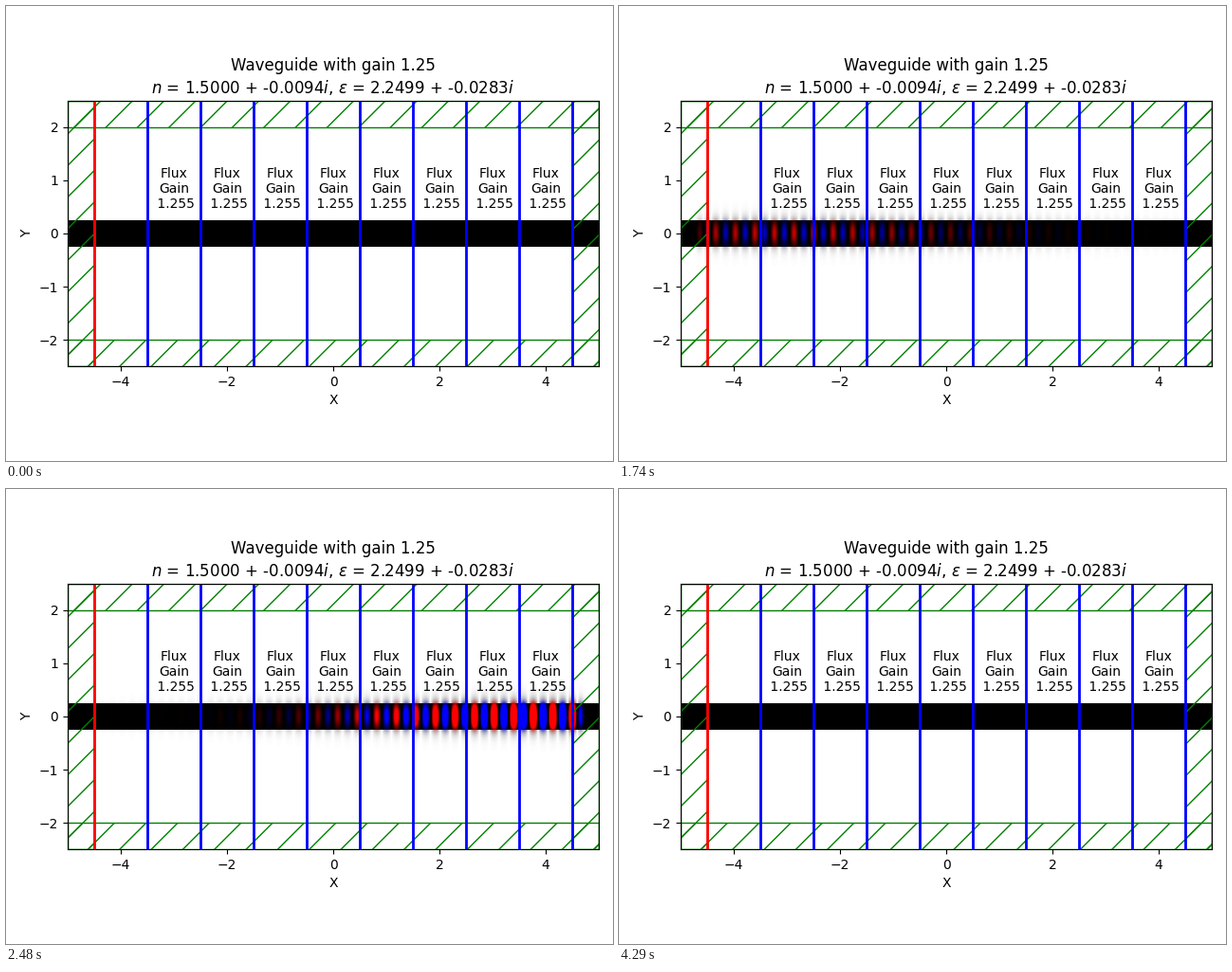
Recreate the animation shown at these times as a matplotlib script. Size 640 px wide and 480 px high, loop 4360 ms.

```python
import numpy as np
import matplotlib.pyplot as plt
from matplotlib.animation import FuncAnimation
from matplotlib.colors import LinearSegmentedColormap
from matplotlib.patches import Rectangle

FRAMES, LOOP_MS = 65, 4360
W, H, DPI = 640, 480, 100

# Guided mode of the slab
WAVELENGTH, CORE_N, HALF_WIDTH = 0.532, 1.5, 0.25
K0 = 2 * np.pi / WAVELENGTH
KAPPA = 4.795
BETA = np.sqrt((CORE_N * K0) ** 2 - KAPPA ** 2)
GAMMA = np.sqrt(BETA ** 2 - K0 ** 2)

# Pulse; times are counted in frames
SOURCE_X, PML = -4.5, 0.5
SPEED = 0.694
PEAK, SIGMA = 24.5, 4.7
AMPLITUDE, GAIN = 0.8, np.log(1.255) / 2
PHASE = 2 * np.pi * 0.44

plt.rcParams["font.family"] = "DejaVu Sans"
fig = plt.figure(figsize=(W / DPI, H / DPI), dpi=DPI)
ax = fig.add_axes([65 / W, 100 / H, 560 / W, 280 / H])


def centers(low, high, count):
    step = (high - low) / count
    return low + step * (np.arange(count) + 0.5)


x = centers(-5, 5, 560)
y = np.abs(centers(-0.75, 0.75, 84))
dist = np.abs(x - SOURCE_X)

# Cosine in the core, exponential tail outside
profile = np.where(
    y <= HALF_WIDTH,
    np.cos(KAPPA * y),
    np.cos(KAPPA * HALF_WIDTH) * np.exp(-GAMMA * (y - HALF_WIDTH)),
)
depth = np.clip((np.abs(x) - (5 - PML)) / PML, 0, 1)
absorb = np.exp(-17.3 * depth ** 3)
carrier = AMPLITUDE * absorb * np.exp(GAIN * dist) * np.cos(BETA * dist - PHASE)


def field(frame):
    lag = frame - PEAK - dist / SPEED
    return np.outer(profile, carrier * np.exp(-lag ** 2 / (2 * SIGMA ** 2)))


cmap = LinearSegmentedColormap.from_list(
    "field", [(0, 0, 1, 1), (0, 0, 0, 0), (1, 0, 0, 1)], N=255
)
ax.add_patch(Rectangle((-5, -HALF_WIDTH), 10, 2 * HALF_WIDTH, color="k", lw=0, zorder=-1))
image = ax.imshow(
    field(0), cmap=cmap, vmin=-1, vmax=1, origin="lower",
    extent=(-5, 5, -0.75, 0.75), interpolation="nearest", aspect="auto",
)

# Absorbing layers
for x0, y0, w, h in [(-5, -2.5, PML, 5), (4.5, -2.5, PML, 5),
                     (-5, 2, 10, PML), (-5, -2.5, 10, PML)]:
    ax.add_patch(Rectangle((x0, y0), w, h, fc="none", ec="g", hatch="/", lw=1))

# Source and flux monitors
ax.plot([SOURCE_X] * 2, [-2.5, 2.5], "r", lw=2)
for pos in np.arange(-3.5, 5):
    ax.plot([pos] * 2, [-2.5, 2.5], "b", lw=2)
for pos in np.arange(-3, 5):
    ax.text(pos, 0.48, "Flux\nGain\n 1.255", ha="center")

ax.set_xlim(-5, 5)
ax.set_ylim(-2.5, 2.5)
ax.set_xticks(range(-4, 5, 2))
ax.set_yticks(range(-2, 3))
ax.set_xlabel("X")
ax.set_ylabel("Y")
ax.set_title(
    "Waveguide with gain 1.25\n"
    r"$n$ = 1.5000 + -0.0094$i$, $\varepsilon$ = 2.2499 + -0.0283$i$"
)


def update(frame):
    image.set_data(field(frame))
    return [image]


anim = FuncAnimation(fig, update, frames=FRAMES, interval=LOOP_MS / FRAMES,
                     repeat=True, repeat_delay=0)
plt.show()
```
